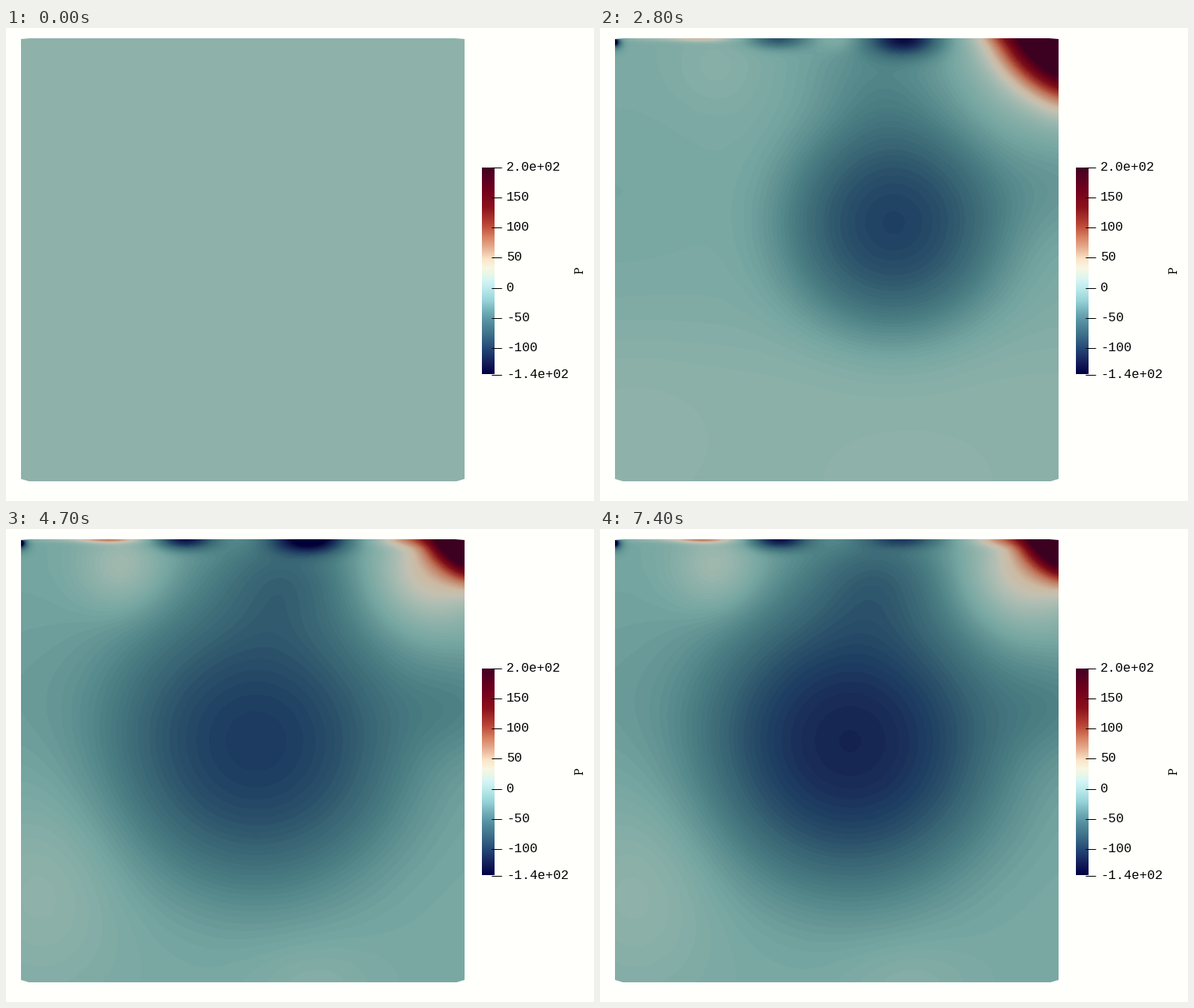
A matplotlib script that plays this animation: 745 by 600 pixels, repeating every 8600 ms.

```python
import numpy as np
import matplotlib.pyplot as plt
from matplotlib.animation import FuncAnimation
from matplotlib.colors import to_rgb
from matplotlib.patches import Polygon

W, H, DPI = 745, 600, 100
LEFT, RIGHT, TOP, BOTTOM = 19, 581, 13, 575
STEP, LOOP = 100, 8600          # ms
START, END = 2000, 7400
PAUSES = (2300, 3100, 4800, 6100)
LOW, HIGH, BAND = -140, 200, 3  # pressure range and contour step

STOPS = {-140: "#020038", -112: "#192a56", -100: "#1e3e62", -75: "#386473",
         -50: "#4e8286", -20: "#77a7a2", 0: "#8eb2aa", 20: "#aabcb2",
         35: "#c3c1b2", 50: "#cdbaa2", 85: "#be7358", 105: "#a84132",
         135: "#7d0f18", 165: "#64001a", 200: "#3c0020"}

xs = np.arange(LEFT, RIGHT, dtype=np.float32) + 0.5
ys = np.arange(TOP, BOTTOM, dtype=np.float32) + 0.5


def ramp(values):
    rgb = np.array([to_rgb(c) for c in STOPS.values()])
    return np.stack([np.interp(values, list(STOPS), ch) for ch in rgb.T], -1)


def unlit(values):
    """Legend colours: the shaded ramp, brightened most around white."""
    gain = 1.12 + 0.2 * np.exp(-((values - 10) / 50) ** 2)
    tint = np.outer(values < 20, [0, 0, 0.07])
    return np.clip(ramp(values) * (gain[:, None] + tint), 0, 1)


LEVELS = ramp(np.arange(LOW - 1, HIGH + 2, BAND))


def bump(amp, cx, cy, wx, wy):
    across = np.exp(-((xs - cx) / wx) ** 2)
    down = np.exp(-((ys - cy) / wy) ** 2)
    return np.outer(amp * down, across).astype(np.float32)


def pulse(t, peak, width):
    return np.exp(-((t - peak) / width) ** 2)


def vortex(cx, cy, depth, radius):
    r2 = (xs - cx)[None, :] ** 2 + (ys - cy)[:, None] ** 2
    r2 = (r2 / radius ** 2).astype(np.float32)
    core = 0.1 * np.exp(-r2 / np.float32(0.16))
    return -np.float32(depth) * (0.9 * np.exp(-r2 ** np.float32(1.6)) + core)


def corner(size):
    u = ((RIGHT - xs) / size) ** 1.3
    w = ((ys - TOP) / (0.95 * size)) ** 1.3
    s = (u[None, :] + w[:, None]).astype(np.float32)
    return 330 * np.exp(-s ** np.float32(1.54))


def pressure(t):
    grow = min((t - START) / 1150, 1)
    young = (1 - grow) ** 4
    settled = grow ** 6
    first, late, last = pulse(t, 2800, 500), pulse(t, 6500, 450), pulse(t, END, 400)
    kick = first + late

    # Bulk level, different above and below the vortex
    mix = 1 / (1 + np.exp(-(ys - 400) / 28))
    level = -20 * grow * (1 - mix) + (7 * late - 18) * settled * mix
    v = np.repeat(level[:, None], xs.size, axis=1).astype(np.float32)

    # The vortex leaves the corner, sinks to the middle and grows
    cx = 533 - 215 * grow ** 0.8
    cy = 68 + 202 * np.sin(grow * np.pi / 2) - 15 * late
    drift = (59 + t / 200) * (0.6 + 0.4 * grow)
    v += vortex(cx, cy, drift + 20 * first - 16 * late, 27 + 170 * grow)

    v += corner(33 + 10 * grow + 30 * kick)
    v -= 230 * np.exp(-np.hypot((xs - LEFT)[None, :], (ys - 18)[:, None]) / 4.5)

    parts = [
        # walls and floor
        (-8 * grow - 12 * late, LEFT, 210, 150, 120),
        (-24 * grow, RIGHT, cy - 48, 80, 70),
        (18 * settled - 7 * late, 45, 460, 100, 130),
        (10 * grow ** 3 + 7 * late, 390, BOTTOM, 80, 55),
        # under the lid
        (-36 * grow, 355, 50, 95, 70),
        (68 * grow * (1 - 0.55 * kick), 540, 52, 75, 70),
        (45 * grow * (1 - 0.7 * kick), 505, TOP, 38, 9),
        (36 * grow ** 4, 148, 48, 55, 55),
        (75 * grow + 50 * late, 130, TOP, 38, 5),
        (grow * (5 + 22 * kick), 300, TOP, 28, 16),
        (-100 * grow - 50 * late, 225, TOP, 37, 13 + 5 * late),
        (grow * (60 * last - 110 - 35 * kick), 386, TOP, 46,
         17 + 5 * kick - 6 * last),
        (22, 70, TOP, 50, 4),
        # first moments only
        (-24 * young, 130, TOP, 230, 280),
        (-14 * young, 505, 50, 45, 50),
        (12 * young, 560, 170, 110, 180)]
    return v + sum(bump(*p) for p in parts)


def picture(t):
    v = pressure(t) if t >= START else np.zeros((ys.size, xs.size))
    index = np.rint((v - LOW + 1) / BAND).astype(int)
    return LEVELS[np.clip(index, 0, len(LEVELS) - 1)]


fig = plt.figure(figsize=(W / DPI, H / DPI), dpi=DPI, facecolor="#fffffc")
ax = fig.add_axes([0, 0, 1, 1])
ax.axis("off")

field = ax.imshow(picture(0), extent=(LEFT, RIGHT, BOTTOM, TOP),
                  interpolation="nearest", aspect="auto")
outline = [(LEFT, TOP + 1), (LEFT + 12, TOP), (RIGHT - 12, TOP),
           (RIGHT, TOP + 1), (RIGHT, BOTTOM - 3), (RIGHT - 10, BOTTOM),
           (LEFT + 10, BOTTOM), (LEFT, BOTTOM - 3)]
field.set_clip_path(Polygon(outline, transform=ax.transData))

ax.imshow(unlit(np.linspace(HIGH, LOW, 262))[:, None, :],
          extent=(603, 619, 439, 177), interpolation="nearest", aspect="auto")


def tick(value, label):
    y = int(176.3 + (HIGH - value) * 0.764) + 0.5
    ax.plot([615, 628], [y, y], color="black", lw=0.72, solid_capstyle="butt")
    ax.text(634, y + 4.3, label, family="Liberation Mono", size=11.75,
            va="baseline")


for value in range(-100, 200, 50):
    tick(value, str(value))
tick(HIGH, "2.0e+02")
tick(-144, "-1.4e+02")
ax.text(727.5, 307.5, "P", family="DejaVu Serif", size=9.8, rotation=90,
        ha="center", va="center")

ax.set_xlim(0, W)
ax.set_ylim(H, 0)


def draw(frame):
    t = min(frame * STEP, END)
    if t in PAUSES:
        t -= STEP
    field.set_data(picture(t))
    return [field]


anim = FuncAnimation(fig, draw, frames=LOOP // STEP, init_func=lambda: draw(0),
                     interval=STEP, repeat=True, repeat_delay=0)
plt.show()
```
